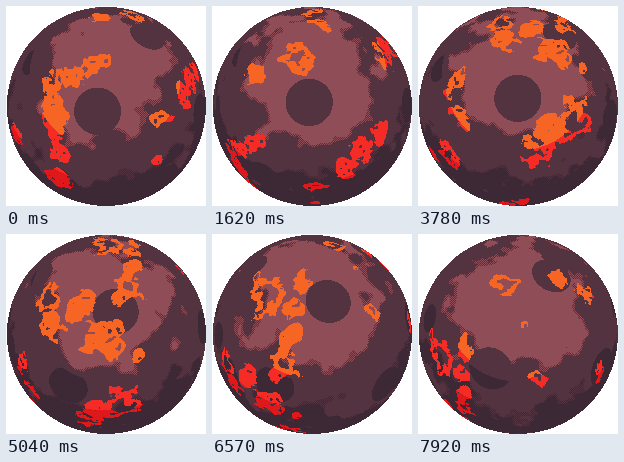
An HTML page with a canvas for the animation above (8 s loop, 200 px wide and 200 px high).

```html
<!DOCTYPE html>
<html lang="en">
<head>
<meta charset="utf-8">
<title>Lava planet</title>
<style>
  html, body { margin: 0; width: 100%; height: 100%; overflow: hidden; background: #fff; }
  canvas { display: block; width: 100vmin; height: 100vmin; image-rendering: pixelated; }
</style>
</head>
<body>
<canvas id="planet" width="200" height="200"></canvas>
<script>
const SIZE = 200, LOOP = 8000, STEP = 90;
const ctx = document.getElementById('planet').getContext('2d');
const image = ctx.createImageData(SIZE, SIZE);
const pixels = new Uint32Array(image.data.buffer);

const color = (r, g, b) => (255 << 24 | b << 16 | g << 8 | r) >>> 0;
const GROUND = [color(143, 77, 87), color(82, 51, 63), color(61, 41, 54)];
const LAVA = [color(247, 101, 37), color(245, 43, 37), color(222, 24, 27)];

// Surface drift per second, in projected units (planet radius = 1).
const VX = -0.175, VY = 0.27, SPEED = Math.hypot(VX, VY);
const DX = VX / SPEED, DY = VY / SPEED;

// Flattens the sphere: the rim is stretched to twice the scale of the centre.
function project(x, y) {
  const cx = (x - 100) / 100, cy = (y - 100) / 100;
  const k = 1 / (1 + Math.sqrt(Math.max(0, 1 - cx * cx - cy * cy)));
  return { x: cx * k, y: cy * k, scale: k };
}

// Lava pools placed where they stand at a given second; a negative radius makes a ring.
const POOLS = [];
function pool(time, x, y, radius) {
  const p = project(x, y);
  POOLS.push({ x: p.x - VX * time, y: p.y - VY * time,
               r: Math.abs(radius) / 100 * p.scale, ring: radius < 0 });
}
// A stream is a row of pools along a line.
function stream(time, x1, y1, x2, y2, radius, count) {
  for (let i = 0; i < count; i++) {
    const f = i / (count - 1);
    pool(time, x1 + (x2 - x1) * f, y1 + (y2 - y1) * f, radius);
  }
}

stream(0, 90, 58, 47, 76, 12, 3);
stream(0, 45, 94, 55, 147, 11, 4);
pool(0, 50, 171, 14);
pool(0, 10, 130, 10);
pool(0, 150, 152, 7);

stream(1.62, 168, 125, 133, 160, 12, 3);
pool(1.62, 103, 181, 9);
pool(1.62, 42, 68, 12);

pool(2.79, 147, 98, -17);
pool(2.79, 159, 68, 10);
pool(2.79, 178, 71, -15);
pool(2.79, 49, 114, -15);
stream(2.79, 71, 62, 58, 42, 9, 2);

pool(3.78, 42, 72, 11);
pool(3.78, 122, 38, 8);
pool(3.78, 140, 125, 11);

pool(5.04, 97, 98, -12);
stream(5.04, 80, 110, 129, 122, 8, 3);
pool(5.04, 45, 90, 12);
pool(5.04, 42, 62, -13);

pool(6.57, 52, 60, -18);
stream(6.57, 90, 48, 74, 102, 11, 3);
pool(6.57, 71, 130, -16);
pool(6.57, 45, 40, -7);
pool(6.57, 35, 143, 13);

pool(7.92, 88, 50, -12);
pool(7.92, 105, 90, 6);
pool(7.92, 123, 141, 9);
stream(7.92, 140, 43, 168, 60, 10, 2);
pool(7.92, 182, 137, 9);

// Craters: distance along the drift, offset across it, radius.
const CRATERS = [0.046, -0.53, -1.25, -1.75, -2.31, -2.95].map(s => [s, -0.026, 0.12]);
for (let k = 0; k < 8; k++) CRATERS.push([0.8 - k * 0.58, 0.63, 0.14], [0.6 - k * 0.58, -0.6, 0.1]);

// Seeded value noise.
let seed = 29;
const lattice = Float32Array.from({ length: 4096 }, () =>
  (seed = (Math.imul(seed, 1664525) + 1013904223) >>> 0) / 4294967296);
const cell = (x, y) => lattice[(x & 63) + (y & 63) * 64];
function noise(x, y) {
  const ix = Math.floor(x), iy = Math.floor(y);
  let u = x - ix, v = y - iy;
  u *= u * (3 - 2 * u);
  v *= v * (3 - 2 * v);
  const a = cell(ix, iy), b = cell(ix, iy + 1);
  const top = a + (cell(ix + 1, iy) - a) * u;
  return top + (b + (cell(ix + 1, iy + 1) - b) * u - top) * v;
}
const fbm = (x, y) => (noise(x, y) * 4 + noise(x * 2, y * 2) * 2 + noise(x * 4, y * 4)) / 7;

const disc = [];
for (let y = 0; y < SIZE; y++) {
  for (let x = 0; x < SIZE; x++) {
    if (Math.hypot(x - 99.9, y - 99.9) > 99.5) continue;
    const p = project(x, y);
    disc.push({ i: y * SIZE + x, x: p.x, y: p.y,
                light: Math.hypot(x - 100, y - 70), dither: (x + y) % 2 * 4 });
  }
}

const shade = (value, first, second) => value < first ? 0 : value < second ? 1 : 2;

function inLava(x, y, pools) {
  const wx = x + (noise(x * 13, y * 13 + 9) - 0.5) * 0.07;
  const wy = y + (noise(x * 13 + 31, y * 13) - 0.5) * 0.07;
  let rough = -1;
  for (const p of pools) {
    const dx = wx - p.x, dy = wy - p.y, reach = p.r * 1.5;
    if (dx * dx + dy * dy > reach * reach) continue;
    if (rough < 0) rough = fbm(x * 20 + 5, y * 20);
    const d = Math.sqrt(dx * dx + dy * dy) / p.r + (rough - 0.5) * 1.4;
    if (d < 1.05 && !(p.ring && d < 0.5)) return noise(x * 38, y * 38) < 0.83;
  }
  return false;
}

function draw(time) {
  const ox = VX * time, oy = VY * time;
  const pools = POOLS.filter(p => Math.hypot(p.x + ox, p.y + oy) < 1.2 + p.r);
  const craters = CRATERS.filter(c => Math.abs(c[0] + SPEED * time) < 1.2);
  pixels.fill(0xffffffff);
  for (const { i, x: px, y: py, light, dither } of disc) {
    const x = px - ox, y = py - oy;
    if (inLava(x, y, pools)) {
      pixels[i] = LAVA[shade(light, 74, 106)];
      continue;
    }
    const bumps = fbm(x * 7, y * 7) - 0.5;
    let tone = shade(light + bumps * 58 + dither, 64, 108);
    const along = x * DX + y * DY, across = x * DY - y * DX;
    for (const [s, q, r] of craters) {
      if (Math.hypot(along - s, across - q) < r) tone = Math.max(tone, light < 77 ? 1 : 2);
    }
    pixels[i] = GROUND[tone];
  }
  ctx.putImageData(image, 0, 0);
}

let shown = -1;
function tick() {
  const step = Math.floor(performance.now() % LOOP / STEP);
  if (step !== shown) draw((shown = step) * STEP / 1000);
  requestAnimationFrame(tick);
}
tick();
</script>
</body>
</html>
```
